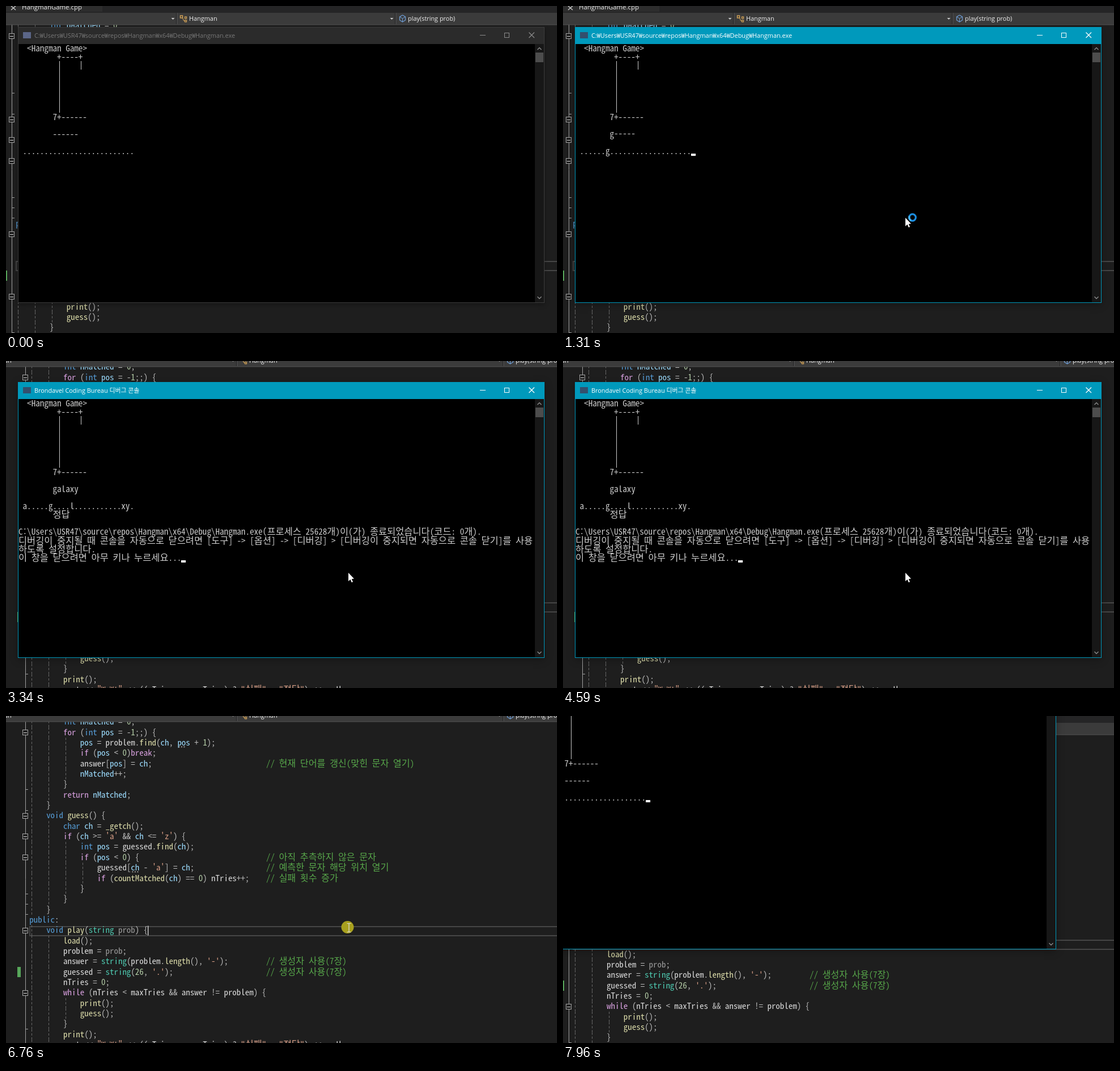
These frames come from a looping animation (972 by 576 pixels, 8000 ms). An HTML page with a canvas:

```html
<!DOCTYPE html>
<html lang="ko">
<head>
<meta charset="utf-8">
<title>Hangman</title>
<style>
  html, body { margin: 0; width: 100%; height: 100%; overflow: hidden; background: #1e1e1e; }
  canvas { display: block; }
</style>
</head>
<body>
<canvas id="stage" width="972" height="576"></canvas>
<script>
const ctx = document.getElementById('stage').getContext('2d');
const LOOP = 8000;
const MONO = '"Noto Sans Mono CJK KR", "Liberation Mono", monospace';
const HANGUL = '"Noto Sans CJK KR", sans-serif';
const SANS = '"Open Sans", "Noto Sans CJK KR", sans-serif';

const CODE = `        int nMatched = 0;
        for (int pos = -1;;) {
            pos = problem.find(ch, pos + 1);
            if (pos < 0)break;
            answer[pos] = ch; // 현재 단어를 갱신(맞힌 문자 열기)
            nMatched++;
        }
        return nMatched;
    }
    void guess() {
        char ch = _getch();
        if (ch >= 'a' && ch <= 'z') {
            int pos = guessed.find(ch);
            if (pos < 0) { // 아직 추측하지 않은 문자
                guessed[ch - 'a'] = ch; // 예측한 문자 해당 위치 열기
                if (countMatched(ch) == 0) nTries++; // 실패 횟수 증가
            }
        }
    }
public:
    void play(string prob) {
        load();
        problem = prob;
        answer = string(problem.length(), '-'); // 생성자 사용(7장)
        guessed = string(26, '.'); // 생성자 사용(7장)
        nTries = 0;
        while (nTries < maxTries && answer != problem) {
            print();
            guess();
        }
        print();
        cout << "₩n₩t" << ((nTries == maxTries) ? "실패" : "정답") << endl;`.split('\n');
const ANSWER_LINE = 23, PLAY_LINE = 20, COMMENT_COL = 56;
const FOLDS = [1, 9, 11, 13, 20, 26];
const BLOCK_ENDS = [6, 8, 16, 17, 18, 29];
const CODE_LEFT = 41.3, CODE_CELL = 7.46, LINE = 18.34;

// ---------- helpers ----------
function rect(x, y, w, h, color) {
  ctx.fillStyle = color;
  ctx.fillRect(x, y, w, h);
}
function path(points, color, width = 1, dash = []) {
  ctx.beginPath();
  points.forEach(([x, y]) => ctx.lineTo(x, y));
  ctx.strokeStyle = color;
  ctx.lineWidth = width;
  ctx.setLineDash(dash);
  ctx.stroke();
  ctx.setLineDash([]);
}
function box(x, y, w, h, color, width = 1) {
  ctx.strokeStyle = color;
  ctx.lineWidth = width;
  ctx.strokeRect(x, y, w, h);
}
function label(text, x, y, color, size = 10.9) {
  ctx.font = `${size}px ${SANS}`;
  ctx.fillStyle = color;
  ctx.fillText(text, x, y);
}

// Monospaced text on a cell grid; Hangul takes two cells.
function advance(glyph, family) {
  ctx.font = `100px ${family}`;
  return ctx.measureText(glyph).width / 100;
}
const latinAdvance = advance('0', MONO), hangulAdvance = advance('가', HANGUL);
const columns = s => s.length + (s.match(/[가-힣]/g) || []).length;
function gridText(text, x, y, cell, color) {
  ctx.fillStyle = color;
  for (const run of text.matchAll(/[가-힣]+|[^가-힣\s]+/g)) {
    const wide = /[가-힣]/.test(run[0]);
    ctx.font = wide ? `${2 * cell / hangulAdvance}px ${HANGUL}` : `${cell / latinAdvance}px ${MONO}`;
    ctx.fillText(run[0], x + columns(text.slice(0, run.index)) * cell, y);
  }
}

// ---------- editor ----------
function tokenColor(token, next) {
  if (token.startsWith('//')) return '#57a64a';
  if (/^['"]/.test(token)) return '#d69d85';
  if (/^\d/.test(token)) return '#b5cea8';
  if (/^(int|void|char|public)$/.test(token)) return '#569cd6';
  if (/^(for|if|while|return|break)$/.test(token)) return '#d8a0df';
  if (token === 'string') return '#4ec9b0';
  if (/^(pos|ch|nMatched)$/.test(token)) return '#9cdcfe';
  if (token === 'prob') return '#9a9a9a';
  if (/^\w/.test(token)) return next === '(' ? '#dcdcaa' : '#dadada';
  return '#b8b8b8';
}

function codeLine(source, y) {
  const indent = source.search(/\S/);
  for (let c = 0; c < indent; c += 4) {
    const gx = Math.round(CODE_LEFT + c * CODE_CELL + 4) + .5;
    path([[gx, y - 9], [gx, y + 9.3]], '#6a6a6a', 1, [4, 3]);
  }
  for (const m of source.matchAll(/\/\/.*|'[^']*'|"[^"]*"|\w+|[^\s\w'"\/]+/g)) {
    const col = m[0].startsWith('//') ? COMMENT_COL : columns(source.slice(0, m.index));
    gridText(m[0], CODE_LEFT + col * CODE_CELL, y + 4.7, CODE_CELL, tokenColor(m[0], source[m.index + m[0].length]));
  }
}

function dropArrow(x, y) {
  ctx.fillStyle = '#c8c8c8';
  ctx.beginPath();
  ctx.moveTo(x - 3, y - 1);
  ctx.lineTo(x + 3, y - 1);
  ctx.lineTo(x, y + 2);
  ctx.fill();
}

function navBar(debug) {
  const y = debug ? 22 : -1, first = debug ? 301.5 : 407.5, second = debug ? 687.5 : 877.5;
  rect(0, 0, 972, y + 11, '#252526');
  if (debug) {
    rect(0, 0, 170, 10, '#2d2d2d');
    path([[9, 0], [17, 7]], '#d0d0d0', 1.3);
    path([[17, 0], [9, 7]], '#d0d0d0', 1.3);
    label('HangmanGame.cpp', 28, 6, '#e8e8e8', 11.4);
  }
  rect(0, y - 10, 972, 21, '#3b3b3b');
  rect(0, y + 10.5, 972, 1, '#555');
  for (const sep of [first, second]) {
    rect(sep - 1.5, y - 10, 3, 20, '#252526');
    rect(sep, y - 10, 1, 20, '#686868');
    dropArrow(sep - 7, y);
  }
  const ix = first + 6;
  box(ix, y - 5, 4, 4, '#d8a657', 1.4);
  box(ix + 8, y - 3, 3, 3, '#d8a657', 1.2);
  box(ix + 8, y + 3, 3, 3, '#d8a657', 1.2);
  path([[ix + 4, y - 1], [ix + 6, y + 4], [ix + 8, y + 4]], '#d8a657');
  const cx = second + 12;
  path([[cx, y - 6], [cx + 5, y - 3], [cx + 5, y + 3], [cx, y + 6], [cx - 5, y + 3], [cx - 5, y - 3], [cx, y - 6]], '#6f9fd8', 1.2);
  path([[cx - 5, y - 3], [cx, y], [cx + 5, y - 3]], '#6f9fd8');
  path([[cx, y], [cx, y + 6]], '#6f9fd8');
  label('Hangman', first + 21.5, y + 4, '#f0f0f0');
  label('play(string prob)', second + 21.5, y + 4, '#f0f0f0');
  if (!debug) label('an', -3, y + 4, '#f0f0f0');
}

function editor(debug, currentLine, caret) {
  rect(0, 0, 972, 576, '#1e1e1e');
  ctx.save();
  if (debug) ctx.translate(-24, 24);
  const lineY = i => 10.7 + i * LINE;
  box(42, Math.round(lineY(currentLine)) - 7, 1000, 16, '#464646', 2);
  rect(20, Math.round(lineY(24)) - 9, 6, 18, '#57a65a');
  CODE.forEach((source, i) => codeLine(source, lineY(i)));

  path([[34.5, -24], [34.5, 576]], '#a0a0a0');
  for (const i of BLOCK_ENDS) {
    const y = Math.round(lineY(i) + 8.5) + .5;
    path([[34.5, y], [39, y]], '#a0a0a0');
  }
  for (const i of FOLDS) {
    const y = Math.round(lineY(i));
    rect(29, y - 5, 10, 10, '#1e1e1e');
    box(29.5, y - 4.5, 9, 9, '#a5a5a5');
    path([[31, y + .5], [37, y + .5]], '#d8d8d8');
  }
  for (const [line, col] of [[2, 35], [14, 24]])
    for (let k = 0; k < 3; k++) rect(CODE_LEFT + col * CODE_CELL + 2 + k * 4.5, lineY(line) + 6, 2, 2, '#a0a0a0');
  if (caret) rect(250, lineY(PLAY_LINE) - 8, 1.3, 17, '#e0e0e0');
  ctx.restore();
  navBar(debug);
}

// ---------- console ----------
const CELL = 7.56, ROW = 15.12, LEFT = 22, TOP = 67.2;
const SECRET = 'galaxy';
const PATH = ['C:', 'Users', 'USR47', 'source', 'repos', 'Hangman', 'x64', 'Debug', 'Hangman.exe'];
const EXIT_TEXT = [
  PATH.join('\\') + '(프로세스 25628개)이(가) 종료되었습니다(코드: 0개).',
  '디버깅이 중지될 때 콘솔을 자동으로 닫으려면 [도구] -> [옵션] -> [디버깅] > [디버깅이 중지되면 자동으로 콘솔 닫기]를 사용',
  '하도록 설정합니다.',
  '이 창을 닫으려면 아무 키나 누르세요...'
];

function consoleRow(text, col, row) {
  gridText(text, LEFT + col * CELL, TOP + (row + .5) * ROW + 4.9, CELL, '#cccccc');
}

function consoleWindow({ dx = 0, dy = 0, active, guesses, exited, cursor }) {
  const ink = active ? '#fff' : '#8a8a8a';
  ctx.save();
  ctx.translate(dx, dy);
  ctx.shadowColor = 'rgba(0,0,0,.3)';
  ctx.shadowBlur = active ? 14 : 8;
  ctx.shadowOffsetY = 3;
  rect(21, 37, 929, 486, active ? '#0099bc' : '#3c3c3c');
  ctx.shadowColor = 'transparent';
  if (!active) rect(22, 38, 927, 29, '#2b2b2b');
  rect(22, 67, 927, 455, '#000');

  rect(30, 46, 14, 11, active ? '#33506e' : '#5b6688');
  const title = exited ? 'Brondavel Coding Bureau 디버그 콘솔' : PATH.join('₩');
  label(title, 50, 56, active ? '#fff' : '#777');
  path([[836, 51.5], [846, 51.5]], ink);
  box(879.5, 47.5, 8, 8, ink);
  path([[922.5, 46.5], [932, 56]], ink, 1.2);
  path([[932, 46.5], [922.5, 56]], ink, 1.2);

  rect(933, 67, 16, 455, '#171717');
  rect(934, 82, 14, 17, '#4d4d4d');
  path([[937.5, 77], [941, 73.5], [944.5, 77]], '#8a8a8a', 1.4);
  path([[937.5, 512], [941, 515.5], [944.5, 512]], '#8a8a8a', 1.4);

  consoleRow('<Hangman Game>', 2, 0);
  consoleRow('+----+', 9, 1);
  path([[94.5, 97], [94.5, 188]], '#ccc');
  path([[132.5, 97], [132.5, 112]], '#ccc');
  consoleRow('7+------', 8, 8);
  const known = ch => guesses.includes(ch);
  consoleRow([...SECRET].map(ch => known(ch) ? ch : '-').join(''), 8, 10);
  const alphabet = Array.from({ length: 26 }, (_, i) => String.fromCharCode(97 + i));
  consoleRow(alphabet.map(ch => known(ch) ? ch : '.').join(''), 1, 12);
  if (guesses.length === 5) consoleRow('정답', 8, 13);
  if (exited) EXIT_TEXT.forEach((text, i) => consoleRow(text, 0, 15 + i));
  if (cursor) {
    const [col, row] = exited ? [38, 18] : [27, 12];
    rect(Math.round(LEFT + col * CELL), Math.ceil(TOP + (row + 1) * ROW) - 4, 8, 4, '#fff');
  }
  ctx.restore();
}

// ---------- pointers ----------
function arrow(x, y) {
  ctx.beginPath();
  [[0, 0], [0, 15], [3.4, 11.8], [5.8, 17], [8, 16], [5.7, 11], [10, 10.6]].forEach(([a, b]) => ctx.lineTo(x + a, y + b));
  ctx.closePath();
  ctx.fillStyle = '#fff';
  ctx.fill();
}
function spinner(x, y, t) {
  const turn = t / 1000 * 2 * Math.PI;
  const ring = (from, to, color) => {
    ctx.beginPath();
    ctx.arc(x, y, 5.8, from, to);
    ctx.strokeStyle = color;
    ctx.lineWidth = 3.2;
    ctx.stroke();
  };
  ring(0, 2 * Math.PI, '#1c8ee0');
  ring(turn, turn + 1.6, '#45b4f5');
}
function iBeam(x, y) {
  path([[x - 3.5, y - 7.5], [x + 3.5, y - 7.5]], '#ddd');
  path([[x, y - 8], [x, y + 8]], '#ddd', 1.2);
  path([[x - 3.5, y + 7.5], [x + 3.5, y + 7.5]], '#ddd');
}

// ---------- timeline ----------
const KEYS = [[1000, 'g'], [1510, 'a'], [2000, 'l'], [2500, 'x'], [2960, 'y']];
const during = (t, from, to) => t >= from && t < to;

function draw(t) {
  const clicked = t >= 6760;
  editor(t < 3150 || t >= 7350, clicked ? PLAY_LINE : ANSWER_LINE, during(t, 6760, 7350));

  if (t < 4850) {
    consoleWindow({
      active: t >= 70,
      guesses: KEYS.filter(([at]) => t >= at).map(([, ch]) => ch),
      exited: t >= 3080,
      cursor: t >= 70 && !during(t, 4060, 4590)
    });
  } else if (t >= 7550) {
    consoleWindow({ dx: -80, dy: -112, active: true, guesses: [], exited: false, cursor: true });
  }

  if (during(t, 70, 4850)) {
    arrow(604, 373);
    if (t < 3340) spinner(616.5, 372.5, t);
  } else if (during(t, 4850, 7090)) {
    if (during(t, 6760, 6820)) {
      ctx.fillStyle = '#a8a01e';
      ctx.beginPath();
      ctx.arc(602.5, 372, 11, 0, 2 * Math.PI);
      ctx.fill();
    }
    iBeam(605, 373);
  } else if (during(t, 7090, 7960)) {
    const p = Math.min(1, (t - 7090) / 500), ease = p * p * (3 - 2 * p);
    const x = 604 - 132 * ease, y = 373 - 391 * ease;
    arrow(x, y);
    spinner(x + 12, y + 13 * ease, t);
  }
}

const start = performance.now();
function frame() {
  draw((performance.now() - start) % LOOP);
  requestAnimationFrame(frame);
}
frame();
</script>
</body>
</html>
```
